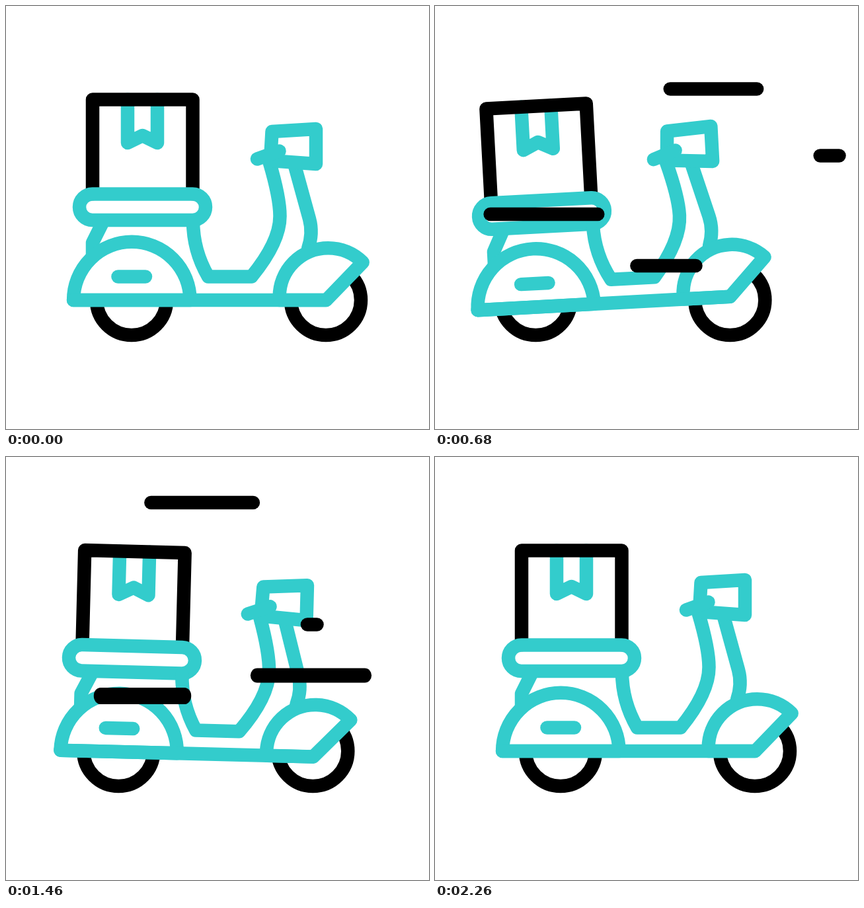
Animation of 640x640 px, one loop 2.4 s. Source, as an HTML page with a canvas:

```html
<!DOCTYPE html>
<html lang="en">
<head>
<meta charset="utf-8">
<title>Delivery scooter</title>
<style>
  html, body { margin: 0; width: 100%; height: 100%; overflow: hidden; background: #fff; }
  canvas { display: block; width: 640px; height: 640px; }
</style>
</head>
<body>
<canvas id="stage" width="640" height="640"></canvas>
<script>
const ctx = document.getElementById('stage').getContext('2d');
const LOOP = 2400, STEP = 20, STROKE = 20.5;
const TEAL = '#33cccc', BLACK = '#000', WHITE = '#fff';
const REAR = 190, FRONT = 484, AXLE = 445, MIDDLE = 292;

const clamp = v => Math.max(0, Math.min(1, v));
const ease = p => (1 - Math.cos(Math.PI * clamp(p))) / 2;

// Eases from rest through the poses: the first is reached at `first`, the others one `beat` apart.
const sway = (first, beat, poses) => t => {
  let value = 0, begin = 0, end = first;
  for (const pose of poses) {
    value += (pose - value) * ease((t - begin) / (end - begin));
    begin = end;
    end += beat;
  }
  return value;
};
const shift = sway(573, 533, [-45, 31.3, -37, 0]);
const bounce = sway(505, 438, [13.6, -11.2, 4.8, -9.8, 0]);
const tilt = sway(640, 540, [-3.1, 0.78, 2.1, 0]);

function shape(color, trace, fill) {
  ctx.beginPath();
  trace();
  if (fill) {
    ctx.fillStyle = fill;
    ctx.fill();
  }
  ctx.strokeStyle = color;
  ctx.stroke();
}

const polyline = (color, ...points) =>
  shape(color, () => points.forEach(([x, y]) => ctx.lineTo(x, y)));

const wheel = x => shape(BLACK, () => ctx.arc(x, AXLE, 53, 0, 2 * Math.PI));

function drawParcel() {
  const left = 131, right = 282.5, top = 141.5, bottom = 284;
  polyline(TEAL, [184, top], [184, 207], [206.5, 196], [229, 207], [229, top]);
  polyline(BLACK, [left, bottom], [left, top], [right, top], [right, bottom]);
  shape(TEAL, () => ctx.roundRect(111, 284.5, 191, 39.5, 19.75));
}

function drawFrame() {
  polyline(TEAL, [147, 326], [131, 358], [131, 376]);
  shape(TEAL, () => {
    ctx.moveTo(283, 325);
    ctx.quadraticCurveTo(283, 370, 306, 409.5);
    ctx.lineTo(371.5, 409.5);
    ctx.quadraticCurveTo(414.5, 357, 414.5, 318);
    ctx.quadraticCurveTo(414.5, 290, 398.5, 236);
  });
  shape(TEAL, () => {
    ctx.moveTo(437, 242);
    ctx.lineTo(459, 322);
    ctx.quadraticCurveTo(465, 344, 457, 367);
  });
}

function drawFenders() {
  shape(TEAL, () => {
    ctx.arc(REAR + 0.3, AXLE, 88.2, Math.PI, 0);
    ctx.closePath();
  }, WHITE);
  shape(TEAL, () => {
    ctx.moveTo(414, AXLE);
    ctx.arc(FRONT + 3.5, AXLE - 5, 73.8, Math.PI, -Math.PI / 4);
    ctx.lineTo(FRONT + 0.5, AXLE);
    ctx.closePath();
  }, WHITE);
  polyline(TEAL, [102, AXLE], [FRONT, AXLE]);
  polyline(TEAL, [169.5, 409.5], [211, 409.5]);
}

function drawHandlebar() {
  shape(TEAL, () => {
    ctx.moveTo(400, 234);
    ctx.lineTo(402.5, 190);
    ctx.lineTo(469, 186);
    ctx.lineTo(469, 239);
    ctx.closePath();
  });
  polyline(TEAL, [380, 231.5], [413.5, 219.5]);
}

function drawScooter(t) {
  ctx.save();
  ctx.translate(shift(t), 0);
  wheel(REAR);
  wheel(FRONT);
  ctx.translate(MIDDLE, AXLE + bounce(t));
  ctx.rotate(tilt(t) * Math.PI / 180);
  ctx.translate(-MIDDLE, -AXLE);
  drawParcel();
  drawFrame();
  drawFenders();
  drawHandlebar();
  ctx.restore();
}

// A streak grows leftwards from x, then its tail catches up with the head.
function drawStreak(t, start, x, y, stretch = 1) {
  const length = 200, headTime = 460, tailDelay = 290, tailTime = 400;
  const age = t - start;
  if (age <= 0 || age >= tailDelay + tailTime) return;
  ctx.save();
  ctx.translate(x, y);
  ctx.scale(1, stretch);
  polyline(BLACK,
    [-length * ease((age - tailDelay) / tailTime), 0],
    [-length * ease(age / headTime), 0]);
  ctx.restore();
}

function drawWind(t) {
  drawStreak(t, 231, 555.5, 125.5);
  drawStreak(t, 325, 259, 315);
  drawStreak(t, 466, 394.5, 393);
  drawStreak(t, 566, 611.5, 226.5);
  drawStreak(t, 1092, 561, 330.5, 1.07);
  drawStreak(t, 1141, 376.5, 69);
  drawStreak(t, 1190, 270, 361.5, 1.23);
  drawStreak(t, 1380, 470.5, 253.5);
}

function draw(now) {
  const t = Math.floor((now % LOOP) / STEP) * STEP;
  ctx.fillStyle = WHITE;
  ctx.fillRect(0, 0, 640, 640);
  ctx.lineWidth = STROKE;
  ctx.lineCap = ctx.lineJoin = 'round';
  drawScooter(t);
  drawWind(t);
}

let origin = null;
function tick(now) {
  origin ??= now;
  draw(now - origin);
  requestAnimationFrame(tick);
}
draw(0);
requestAnimationFrame(tick);
</script>
</body>
</html>
```
